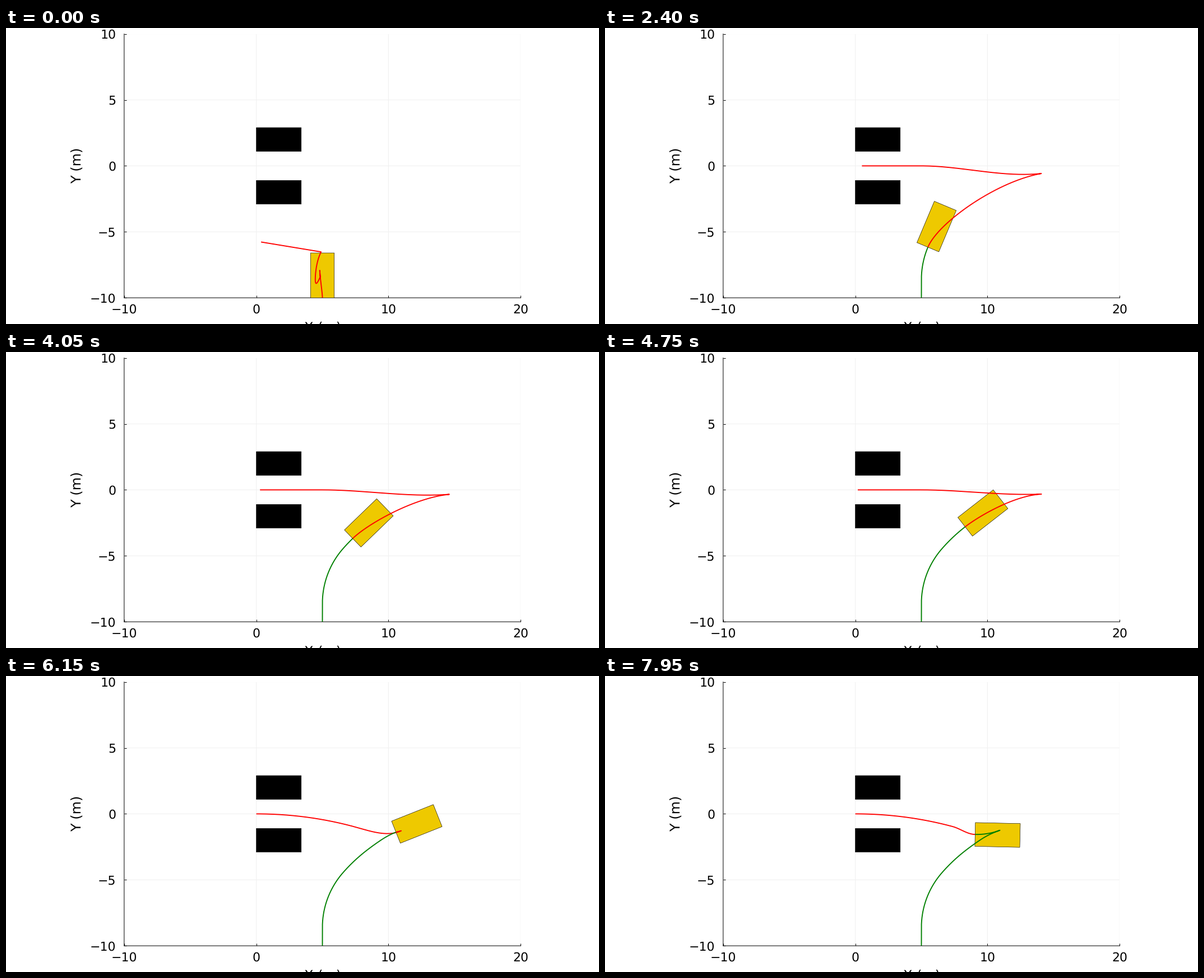
These frames come from a looping animation (1058 px wide and 529 px high, 8 s). A matplotlib script:

```python
import numpy as np
import matplotlib.pyplot as plt
from matplotlib.animation import FuncAnimation
from matplotlib.patches import Polygon, Rectangle

W, H, DPI = 1058, 529, 100
PX = 72 / DPI                      # one pixel in points
FRAMES, STEP_MS, SUB = 160, 50, 10
CAR_L, CAR_W = 3.4, 1.8
SWITCH_T = 6.68                    # forward until here, then reverse
SETTLE_T = 2.4                     # planned line is smooth from here on
FIND_T = 1.45                      # planned line first reaches the bay


def track(t, *knots):
    """Linear motion through knots of (time, value, value, ...)."""
    k = np.array(knots, float)
    return np.array([np.interp(t, k[:, 0], col) for col in k[:, 1:].T])


def direction(deg):
    a = np.radians(deg)
    return np.array([np.cos(a), np.sin(a)])


# Drive: speed over time and heading over distance give the path
times = np.arange((FRAMES - 1) * SUB + 1) * STEP_MS / 1000 / SUB
speed, = track(times, (0, 0), (0.35, 1.75), (2, 1.75), (3.8, 1.93),
               (6, 1.93), (SWITCH_T, 0), (7.24, 1.93), (8, 1.93))
move = (speed[1:] + speed[:-1]) / 2 * np.diff(times)
dist = np.r_[0, np.cumsum(move)]
heading, = track(dist, (0, 90), (1.4, 90), (5.9, 49), (8.3, 38.1),
                 (9.8, 33.5), (11.05, 21.3), (11.4, 20.7), (13.3, -1.3))
gear = np.where(times[1:] <= SWITCH_T, 1, -1)
steps = direction((heading[1:] + heading[:-1]) / 2) * move * gear
trace = np.array([[5], [-10]]) + np.c_[np.zeros(2), np.cumsum(steps, axis=1)]
trace = trace.T


def leg(p0, v0, p1, v1, u=np.linspace(0, 1, 60)):
    """Cubic curve from p0 to p1 with end tangents v0 and v1."""
    u = u[:, None]
    return ((1 + 2 * u) * (1 - u) ** 2 * p0 + u * (1 - u) ** 2 * v0
            + u * u * (3 - 2 * u) * p1 + u * u * (u - 1) * v1)


def forward_leg(t, car, deg, tip, tip_deg):
    """Car to the turning point, with a hook while the plan is unsettled."""
    gap = tip - car
    size = np.hypot(*gap)
    hook = 0.34 * max(0, 1 - (t / SETTLE_T) ** 2)
    u = np.linspace(0, 1, 160)
    wave = np.sin(2 * np.pi * u)
    line = leg(car, 0.6 * size * direction(deg),
               tip, size * direction(tip_deg), u + hook * wave)
    left = np.array([-gap[1], gap[0]]) / max(size, 1e-6)
    return line + 3.5 * hook ** 2 * np.maximum(0, -wave)[:, None] * left


def reverse_leg(start, deg, bend, bend_deg, end):
    """Backwards through the bend, then a plain curve into the bay."""
    size = np.hypot(*(bend - start))
    v = -direction(bend_deg)
    first = leg(start, -size * direction(deg), bend, size * v)
    v = v * np.hypot(*(end - bend))
    return np.vstack([first, leg(bend, v, end, 2 * (end - bend) - v)])


def route(t, car, deg):
    """Planned line at time t, starting at the car."""
    if t < FIND_T:
        t = FIND_T * (t / FIND_T) ** 1.35
    # turning point: x, y, heading on arrival, heading on leaving
    *tip, arrive, leave = track(
        t, (0, 4.9, -6.52, 75, -9.4), (FIND_T, 8.15, -2.15, 60, -10),
        (SETTLE_T, 14.07, -0.58, 10, 6), (3.35, 15.12, -0.36, 8, 6),
        (4.75, 14.08, -0.32, 3, 2.5), (6.15, 10.96, -1.28, 22, 25))
    *bend, bend_deg = track(
        t, (0, 2.6, -6.14, -9.4), (FIND_T, 3.46, -0.3, -12),
        (SETTLE_T, 5, 0, 0), (4.75, 5, 0, 0), (6.15, 7.36, -0.96, -15))
    end = track(t, (0, 0.36, -5.77), (FIND_T, 0.53, -0.15),
                (SETTLE_T, 0.5, 0), (6.15, 0, 0))
    tip, bend = np.array(tip), np.array(bend)
    if t >= SWITCH_T:
        return reverse_leg(car, deg, bend, bend_deg, end)
    return np.vstack([forward_leg(t, car, deg, tip, arrive),
                      reverse_leg(tip, leave, bend, bend_deg, end)])


def car_corners(pos, deg):
    along = direction(deg)
    side = np.array([-along[1], along[0]]) * CAR_W / 2
    front = pos + along * CAR_L
    return np.array([pos + side, front + side, front - side, pos - side])


# Stage
plt.rcParams.update({"font.family": "DejaVu Sans", "path.snap": False,
                     "text.hinting": "no_hinting"})
fig = plt.figure(figsize=(W / DPI, H / DPI), dpi=DPI, facecolor="white")
LEFT, TOP, UNIT = 210.8, 10.6, 23.58
ax = fig.add_axes([LEFT / W, 1 - (TOP + 20 * UNIT) / H,
                   30 * UNIT / W, 20 * UNIT / H])
ax.set(xlim=(-10, 20), ylim=(-10, 10),
       xticks=range(-10, 21, 10), yticks=range(-10, 11, 5))
ax.set_axisbelow(True)
ax.grid(color="#f0f0f0", lw=PX)
ax.tick_params(direction="in", length=4 * PX, width=PX,
               labelbottom=False, labelleft=False)
ax.spines[["top", "right"]].set_visible(False)
for name in ("left", "bottom"):
    ax.spines[name].set_linewidth(PX)


def label(x, y, text, size=22, ha="center", rotation=0):
    fig.text(x / W, 1 - y / H, text, fontsize=size * PX, ha=ha,
             va="baseline", rotation=rotation, rotation_mode="anchor")


def number(v):
    return str(v).replace("-", "\u2212")


for v in range(-10, 21, 10):
    label(LEFT + (v + 10) * UNIT, 510, number(v))
for v in range(-10, 11, 5):
    label(196.5, TOP + (10 - v) * UNIT + 8, number(v), ha="right")
label(565, 543, "X (m)", 24)
label(133.5, 245.5, "Y (m)", 24, rotation=90)

for y in (1.1, -2.9):
    ax.add_patch(Rectangle((0, y), CAR_L, CAR_W, fc="black", ec="black",
                           lw=0.6 * PX, zorder=2))
car_patch = ax.add_patch(Polygon(car_corners(trace[0], heading[0]),
                                 fc="#eec900", ec="black",
                                 lw=0.6 * PX, zorder=3))
style = dict(lw=1.9 * PX, solid_joinstyle="round", solid_capstyle="butt")
plan_line, = ax.plot([], [], color="red", zorder=4, **style)
trace_line, = ax.plot([], [], color="green", zorder=5, **style)


def update(frame):
    i = frame * SUB
    car_patch.set_xy(car_corners(trace[i], heading[i]))
    plan_line.set_data(*route(times[i], trace[i], heading[i]).T)
    trace_line.set_data(*trace[:i + 1].T)
    return car_patch, plan_line, trace_line


anim = FuncAnimation(fig, update, frames=FRAMES, interval=STEP_MS,
                     repeat=True, repeat_delay=0)
plt.show()
```
